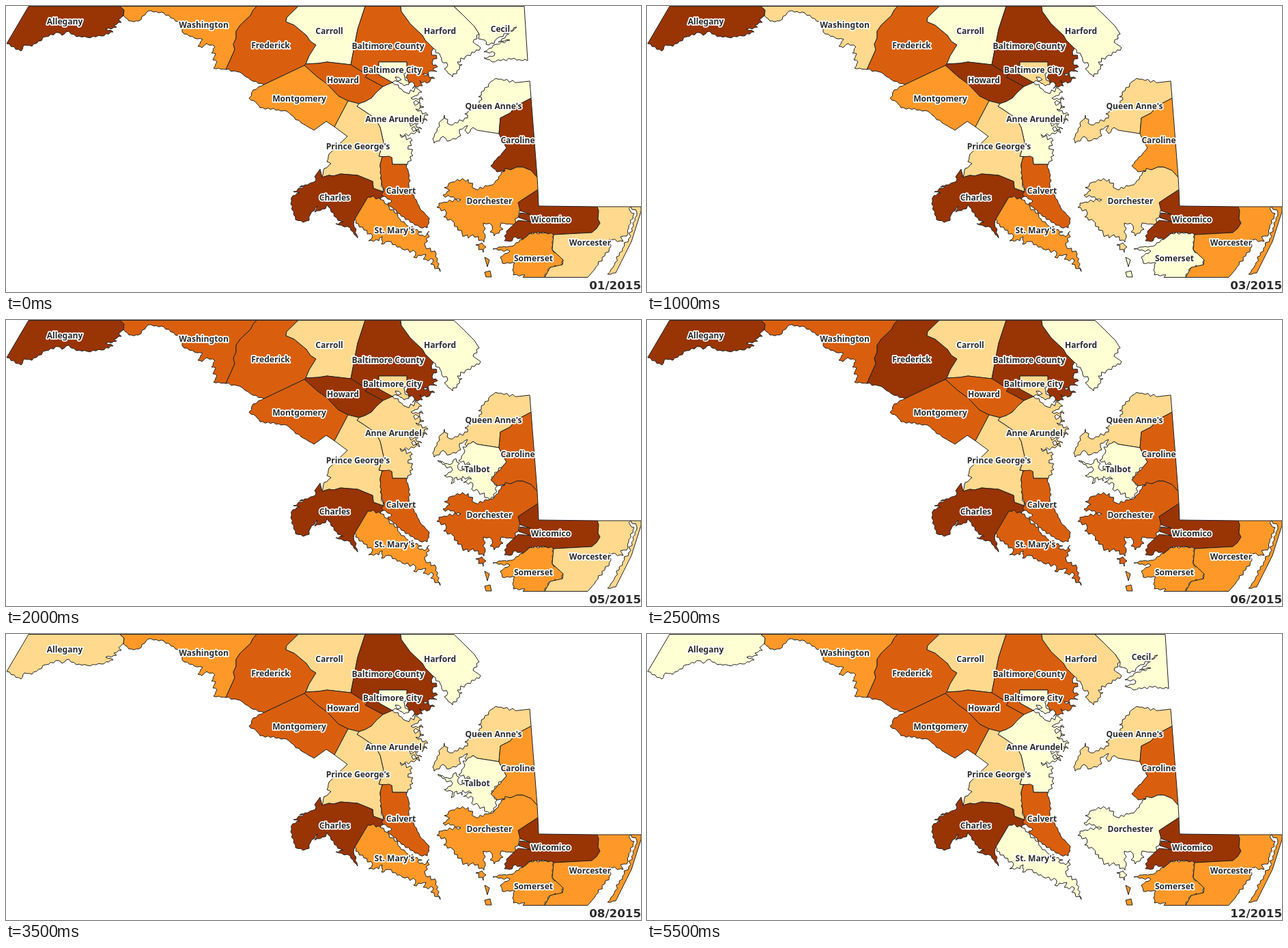
These frames come from a looping animation (930 by 419 pixels, 6000 ms). An HTML page:

```html
<!DOCTYPE html>
<html lang="en">
<head>
<meta charset="utf-8">
<title>Counties by month, 2015</title>
<style>
html, body { margin: 0; width: 100%; height: 100%; overflow: hidden; background: #fff; }
svg { display: block; width: 930px; height: 419px; }
path { stroke: #222; stroke-width: 1; stroke-linejoin: round; }
text { fill: #2b2b2b; font-weight: bold; }
.label { font-family: "Noto Sans", "Open Sans", sans-serif; font-size: 12.1px; text-anchor: middle;
  stroke: #fff; stroke-width: 3.4px; stroke-linejoin: round; paint-order: stroke; }
#date { font-family: "DejaVu Sans", sans-serif; font-size: 16.7px; text-anchor: end; }
</style>
</head>
<body>
<svg viewBox="0 0 930 419"><g id="areas"></g><g id="labels"></g><text id="date" x="930" y="415"></text></svg>
<script>
const byId = id => document.getElementById(id);
const areas = byId("areas"), labels = byId("labels"), date = byId("date");

let seed = 7;
const random = () => (seed = seed * 16807 % 2147483647) / 2147483647;

// Ragged shoreline between two points
function shore([x, y], [u, v], rough) {
  const dx = u - x, dy = v - y, length = Math.hypot(dx, dy), n = Math.round(length / 4);
  let d = "";
  for (let i = 1; i < n; i++) {
    const t = i / n, push = (i % 2 ? 1 : -1) * rough * random() / length;
    d += `L${(x + dx * t - dy * push).toFixed(1)} ${(y + dy * t + dx * push).toFixed(1)}`;
  }
  return d;
}

// "~" switches between straight border and shoreline, "/" starts an island
function outline(text, rough) {
  return text.split(" / ").map(part => {
    let d = "", last, coast = false;
    for (const token of part.split(" ")) {
      if (token === "~") { coast = !coast; continue; }
      const point = token.split(",").map(Number);
      if (coast && last) d += shore(last, point, rough);
      d += (d ? "L" : "M") + point.join(" ");
      last = point;
    }
    return d + "Z";
  }).join("");
}

function county(name, x, y, rough, text) {
  areas.insertAdjacentHTML("beforeend", `<path d="${outline(text, rough)}"/>`);
  labels.insertAdjacentHTML("beforeend", `<text class="label" x="${x}" y="${y + 4.3}">${name}</text>`);
}

county("Allegany", 86, 23, 1.5, "33,.5 167,.5 173,6 172,14 ~ 165,20 169,24 158,28 162,31 146,34 157,38 140,44 119,46 103,45 92,37 82,43 77,39 58,45 38,59 27,57 22,66 1,55 ~");
county("Washington", 289.5, 27.5, 1.5, "167,.5 367,.5 362,6 358,14 343,28 337,37 337,47 333,56 335,64 322,93 ~ 304,91 309,82 303,79 307,70 301,69 306,60 294,55 287,61 281,59 288,49 276,47 258,38 256,26 231,10 209,7 194,22 180,22 172,14 ~ 173,6");
county("Frederick", 387.5, 58, 1.5, "367,.5 428,.5 411,17 410,23 422,28 440,43 446,52 454,57 444,73 439,85 437,87 378,115 ~ 358,108 347,100 338,96 322,93 ~ 335,64 333,56 337,47 337,37 343,28 358,14 362,6");
county("Carroll", 473.5, 37, 1, "428,.5 526,.5 515,34 505,86 470,82 458,84 439,85 444,73 454,57 446,52 440,43 422,28 410,23 411,17");
county("Baltimore County", 559.5, 59, 3, "526,.5 578,.5 579,8 592,26 610,43 614,50 626,62 ~ 623,67 631,77 624,83 632,89 625,92 631,96 621,95 619,101 611,99 628,106 616,113 606,109 610,117 595,121 598,114 590,113 587,96 ~ 587,82 546,82 546,101 566,112 564,115 552,118 526,104 529,101 505,86 515,34");
county("Baltimore City", 566, 94, 3, "546,82 587,82 587,97 ~ 584,104 590,115 583,117 574,110 579,108 570,104 574,111 566,112 ~ 546,101");
county("Harford", 635.5, 37, 2.5, "578,.5 656,.5 668,12 686,30 693,41 ~ 684,53 695,61 693,65 676,72 661,82 668,86 654,104 648,99 642,92 647,87 638,80 636,73 626,62 ~ 614,50 610,43 592,26 579,8");
county("Cecil", 724, 34, 2, "656,.5 759,.5 764,80 ~ 740,78 725,80 712,82 700,76 712,74 716,69 700,67 718,56 738,50 721,53 748,31 720,47 715,55 703,56 701,50 692,48 693,41 ~ 686,30 668,12");
county("Howard", 493.5, 109, 1, "437,87 439,85 458,84 470,82 505,86 529,101 526,104 552,118 543,126 535,135 526,140 517,143 501,139 487,132 470,114 456,104");
county("Montgomery", 429.5, 135.5, 1.5, "437,87 456,104 470,114 487,132 501,139 481,177 469,169 451,182 ~ 432,171 418,160 411,154 372,149 366,141 356,135 362,123 378,115 ~");
county("Anne Arundel", 567.5, 166, 4, "517,143 526,140 535,135 543,126 552,118 566,112 ~ 586,127 604,122 609,126 593,135 611,137 597,141 612,148 600,151 618,160 607,165 617,168 591,171 609,180 594,179 606,186 577,188 595,197 589,205 596,219 588,232 ~ 566,232 565,222 546,220 553,200 548,178 541,165 522,152 514,147");
county("Prince George's", 515.5, 206, 1.5, "501,139 517,143 514,147 522,152 541,165 548,178 553,200 546,220 551,221 548,232 ~ 550,260 552,272 ~ 538,267 537,257 515,248 490,246 480,249 473,248 463,251 ~ 466,238 476,231 470,228 473,217 ~ 500,191 481,177");
county("Charles", 481.5, 281, 1.5, "460,239 463,251 473,248 480,249 490,246 515,248 537,257 538,267 552,272 ~ 553,279 548,284 ~ 530,280 511,312 ~ 509,319 515,340 504,325 483,319 494,317 486,314 470,291 468,297 452,302 456,293 446,305 444,314 435,317 424,313 417,290 420,278 430,274 421,272 437,264 430,265 453,257 452,250 ~");
county("Calvert", 578.5, 271, 1.5, "551,221 561,220 565,222 566,232 587,232 ~ 592,256 590,263 606,296 620,311 617,325 606,324 579,308 559,289 565,286 550,276 554,270 550,260 548,232 ~");
county("St. Mary's", 569, 328.5, 2.5, "530,280 ~ 546,281 561,294 577,312 588,322 609,331 603,334 613,338 620,330 614,352 630,363 636,389 622,378 626,372 611,371 615,364 597,368 600,361 580,356 560,345 550,349 551,338 546,344 531,344 537,337 512,318 511,312 ~");
county("Queen Anne's", 714, 147, 2.5, "710,111 ~ 717,106 750,112 ~ 767,110 769,135 748,146 738,157 724,164 722,187 690,182 684,178 ~ 676,187 672,182 676,175 664,181 666,190 651,197 646,198 640,191 627,201 625,195 637,168 642,160 650,174 676,164 672,158 690,148 697,137 692,133 710,111 ~");
county("Talbot", 690, 219, 3, "684,178 690,182 722,187 726,196 733,208 726,216 ~ 711,230 719,243 715,260 709,263 692,251 682,248 684,240 670,238 682,233 669,229 668,236 660,230 652,240 654,231 642,228 654,219 632,206 650,212 659,203 664,210 662,218 674,222 668,214 680,212 663,206 672,192 669,186 684,178 ~");
county("Caroline", 749.5, 197, 1, "769,135 778,251 769,241 757,236 748,236 739,240 ~ 719,243 710,234 726,216 ~ 733,208 726,196 722,187 724,164 738,157 748,146");
county("Dorchester", 708, 286, 3, "731,238 739,240 748,236 757,236 769,241 778,251 779,269 762,280 750,288 753,296 750,310 ~ 742,320 725,318 728,327 715,337 709,331 712,322 699,318 702,339 700,346 684,335 677,340 668,333 654,315 641,309 645,303 631,295 634,289 666,284 640,277 650,270 642,266 653,258 677,254 687,268 713,262 731,238 ~ / 688,350 ~ 697,347 703,353 699,361 688,350 ~");
county("Wicomico", 798, 312.5, 1.5, "779,269 780,293 866,294 868,300 867,312 870,318 865,326 858,332 802,335 ~ 790,332 768,333 757,342 746,338 738,345 730,344 733,330 ~ 750,314 769,316 751,310 753,303 768,305 753,300 750,288 762,280");
county("Somerset", 772.5, 370, 2, "757,342 768,333 ~ 790,332 802,335 800,357 816,372 815,379 797,383 789,397.5 ~ 757,397.5 ~ 760,394 743,394 742,387 745,376 727,377 724,368 738,359 713,356 722,353 741,352 757,342 ~ / 701,368 708,372 705,382 / 701,390 709,388 711,397 703,397");
county("Worcester", 855.5, 347, 2.5, "866,294 915,294 ~ 914,300 920,304 912,325 909,337 900,338 904,345 883,342 886,352 877,366 862,386 ~ 852,397.5 789,397.5 797,383 815,379 816,372 800,357 802,335 858,332 865,326 870,318 867,312 868,300 / 915,294 930,294 930,301 916,345 893,391 ~ 881,393 889,383 903,355 912,341 924,303 915,294 ~");

// One digit per county and month: 0 hides it, 1-5 pick a shade
const months = [
  "5341411143125431053532",
  "4241411143125431043521",
  "5241521053125432032513",
  "5342522153125432154532",
  "5442521054225432144532",
  "5452521044225442144533",
  "3342511044225432143532",
  "2342511044225432133533",
  "1342511044225432143532",
  "1343511044225542153533",
  "1342511044225432143533",
  "1342412144125412041533"
];
const shades = ["none", "#ffffd4", "#fed98e", "#fe9929", "#d95f0e", "#993404"];
const step = 500;

let shown = -1;
function show(month) {
  if (month === shown) return;
  shown = month;
  [...months[month]].forEach((shade, i) => {
    const display = +shade ? "" : "none";
    areas.children[i].style.display = labels.children[i].style.display = display;
    areas.children[i].setAttribute("fill", shades[shade]);
  });
  date.textContent = String(month + 1).padStart(2, "0") + "/2015";
}

const start = performance.now();
function tick() {
  show(Math.floor((performance.now() - start) / step) % months.length);
  requestAnimationFrame(tick);
}
tick();
</script>
</body>
</html>
```
